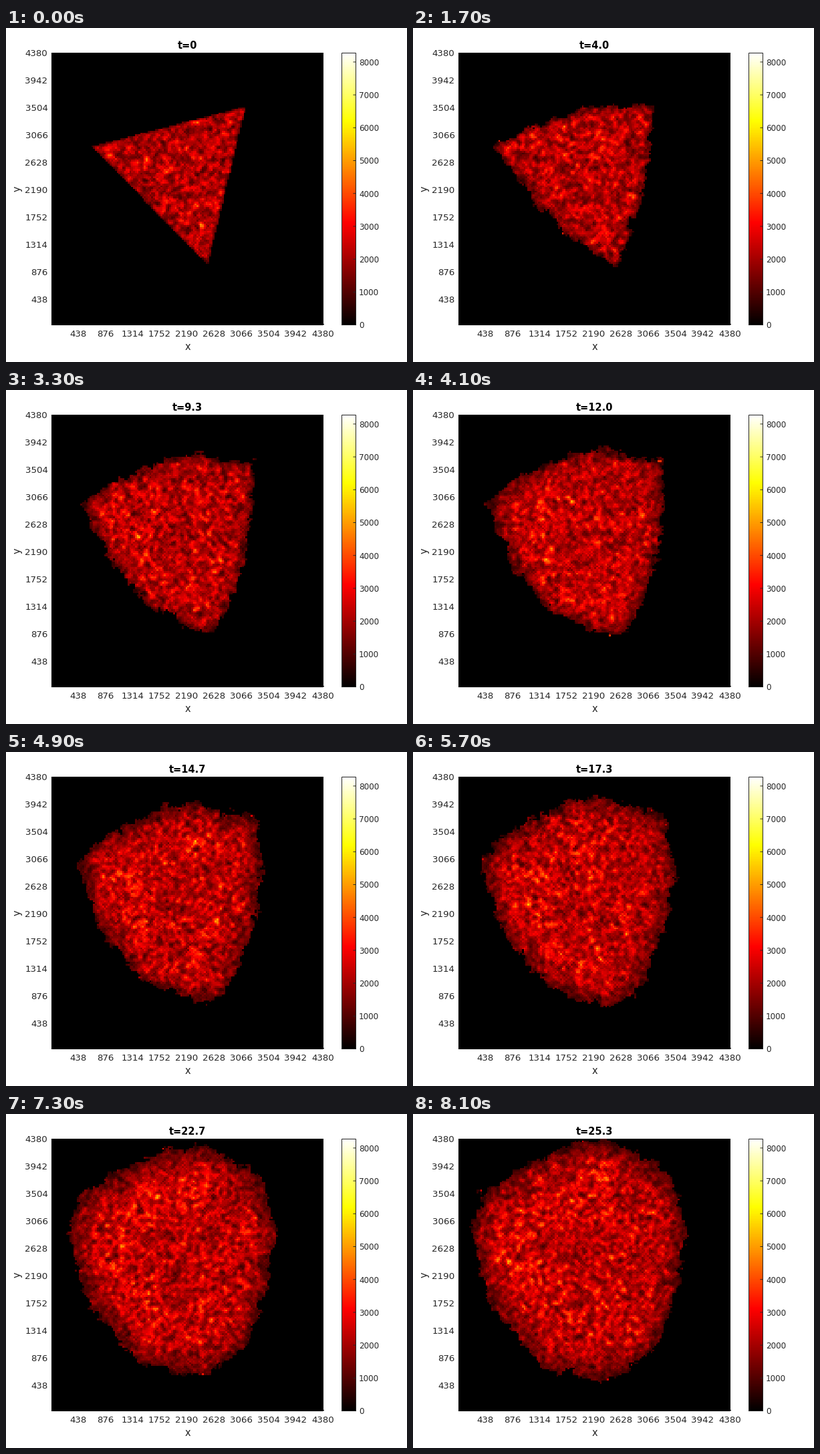
Animation, 600 px wide and 500 px high, one loop 8200 ms. Source, as a matplotlib script:

```python
import numpy as np
import matplotlib.pyplot as plt
from matplotlib.animation import FuncAnimation
from matplotlib.patches import Rectangle

W, H, DPI = 600, 500, 100
N = 150                                   # grid cells per side
LEFT, RIGHT, TOP, BOTTOM = 68, 475, 37, 444.6
CELL = (RIGHT - LEFT) / N
VMAX = 8274
HOLD, STEPS = 5, 77
T_END = (STEPS - 1) / 3
CENTER = (262, 215)
INK = "#262626"

# Tissue outline at the start and at the end, in stage pixels
START = [(128, 177), (359, 117), (302, 354)]
END = [(88, 172), (104, 117), (160, 82), (238, 43), (300, 41), (388, 90),
       (407, 165), (402, 245), (360, 360), (293, 400), (195, 380), (110, 280)]

rng = np.random.default_rng(7)


def hot(v):
    v = np.clip(np.asarray(v) / VMAX, 0, 1)[..., None]
    return np.clip(v * [8 / 3, 8 / 3, 4] - [0, 1, 3], 0, 1)


def box_blur(a, k, passes=1):
    size = 2 * k + 1
    for _ in range(passes):
        for axis in (0, 1):
            pad = [(0, 0), (0, 0)]
            pad[axis] = (k + 1, k)
            c = np.cumsum(np.pad(a, pad), axis=axis)
            hi = np.take(c, range(size, N + size), axis=axis)
            lo = np.take(c, range(N), axis=axis)
            a = (hi - lo) / size
    return a


class Noise:
    """Smooth random field that drifts from one seeded key to the next."""

    def __init__(self, span, k, raw=0.0):
        self.span = span
        self.keys = [self.field(k, raw) for _ in range(STEPS // span + 2)]

    @staticmethod
    def field(k, raw):
        a = rng.standard_normal((N, N))
        b = box_blur(a, k)
        b = b / b.std() + raw * a
        return b / b.std()

    def at(self, step):
        i, r = divmod(step, self.span)
        a = r / self.span * np.pi / 2
        return np.cos(a) * self.keys[i] + np.sin(a) * self.keys[i + 1]


def polar_radius(points, angles):
    p = np.array(points, float) - CENTER
    q = np.roll(p, -1, axis=0)
    s = np.linspace(0, 1, 60, endpoint=False)[None, :, None]
    d = (p[:, None] * (1 - s) + q[:, None] * s).reshape(-1, 2)
    return np.interp(angles, np.arctan2(d[:, 1], d[:, 0]),
                     np.hypot(d[:, 0], d[:, 1]), period=2 * np.pi)


cells = (np.arange(N) + 0.5) * CELL
DX, DY = np.meshgrid(LEFT + cells - CENTER[0], TOP + cells - CENTER[1])
DIST, ANGLE = np.hypot(DX, DY), np.arctan2(DY, DX)
R_START, R_END = (polar_radius(p, ANGLE) for p in (START, END))

grain = Noise(6, 1, 0.6)
patch = Noise(16, 4)
edge = Noise(16, 1)
bumps = Noise(26, 3)
SPARK = rng.random((N, N))


def tissue(step):
    t = max(step - 1, 0) / 3
    grow = (t / T_END) ** 0.85
    radius = R_START + (R_END - R_START) * grow
    rough = min(t / 4, 1) * (2.2 * edge.at(step) + 2.4 * bumps.at(step))
    mask = DIST < radius + rough

    # Cells thin out towards the rim, over a band that widens with time
    band = 1 + round(8 * min(t / 22, 1) ** 0.7)
    depth = box_blur(mask.astype(float), band, 2)
    density = 0.38 + 0.62 * np.clip((depth - 0.4) / 0.55, 0, 1)

    ring = np.exp(-((DIST / radius - 0.58) / 0.22) ** 2)
    level = 1 + 0.15 * min(t / 15, 1) * ring * (1 - 0.5 * np.cos(ANGLE))
    level += 0.05 * patch.at(step)
    n = grain.at(step)
    v = 2100 * density * level * (1 + 0.26 * n + 0.02 * n * n)

    rim = mask & (depth < 0.45) & ((SPARK + step * 0.037) % 1 < 0.02)
    v[rim] = 2400 + 2000 * SPARK[rim]
    return np.where(mask, np.clip(v, 250, VMAX), 0)


fig = plt.figure(figsize=(W / DPI, H / DPI), dpi=DPI, facecolor="white")
ax = fig.add_axes([0, 0, 1, 1])


def label(x, y, s, px, **kw):
    kw = {"ha": "center", "va": "center", "color": INK, **kw}
    return ax.text(x, y, s, fontsize=px * 72 / DPI, family="DejaVu Sans", **kw)


def line(xs, ys, color=INK):
    ax.plot(xs, ys, color=color, lw=0.72, solid_capstyle="butt", snap=False)


def picture(rgb, *extent):
    return ax.imshow(rgb, extent=extent, interpolation="nearest",
                     aspect="auto")


image = picture(hot(tissue(0)), LEFT, RIGHT, BOTTOM, TOP)
line([LEFT, 476], [443.5, 443.5], "black")

for k in range(1, 11):
    label(LEFT + (15 * k - 0.5) * CELL + 0.3, 459, str(438 * k), 13.33)
    label(62.5, 448.2 - 41 * k, str(438 * k), 13.33, ha="right")
label(272, 478, "x", 14.67)
label(17, 241, "y", 14.67, rotation=90)
title = label(271.5, 26.6, "t=0", 14.67, weight="bold", color="black")

picture(hot(np.linspace(VMAX, 0, 256))[:, None], 502, 524, 445, 37)
ax.add_patch(Rectangle((502.5, 37.5), 21, 407, fill=False, ec=INK, lw=0.72,
                       snap=False))
for k in range(9):
    y = 444.5 - 49.2 * k
    line([519.5, 523.5], [y, y])
    label(528, y + 1.4, str(1000 * k), 12, ha="left")

ax.set(xlim=(0, W), ylim=(H, 0))
ax.axis("off")


def update(frame):
    step = max(frame - HOLD + 1, 0)
    image.set_data(hot(tissue(step)))
    title.set_text(f"t={(step - 1) / 3:.1f}" if step else "t=0")
    return image, title


anim = FuncAnimation(fig, update, frames=HOLD + STEPS, interval=100,
                     repeat=True, repeat_delay=0)
plt.show()
```
